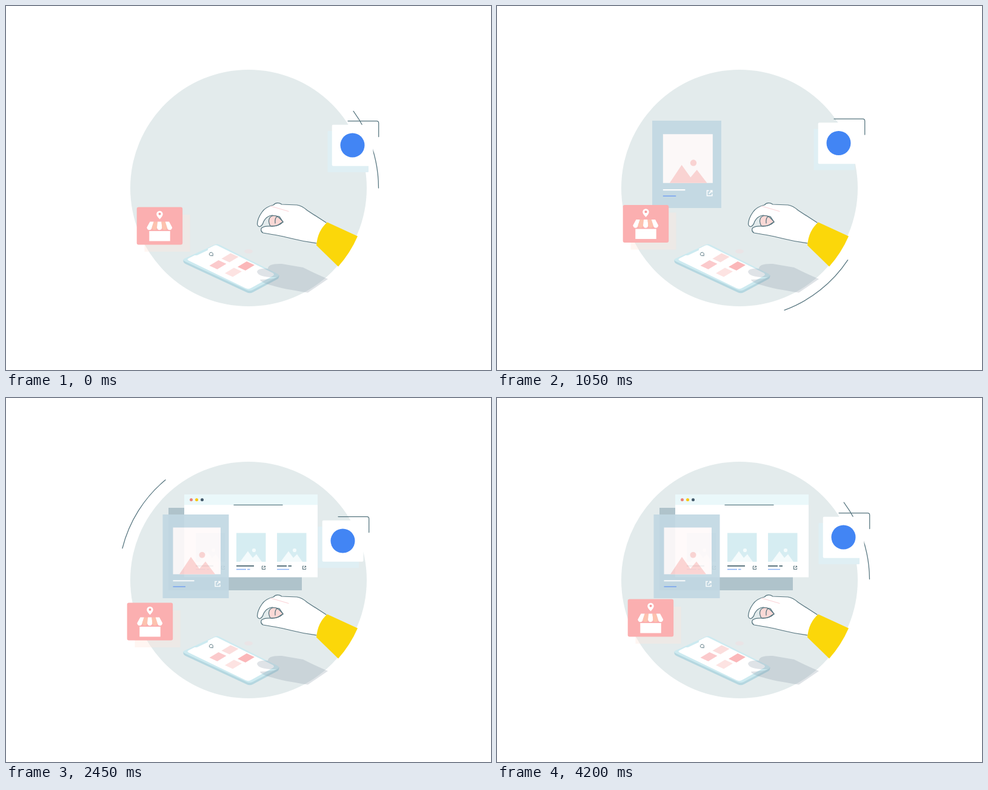
An HTML page that plays this animation: 800 by 600 pixels, repeating every 4.27 s.

```html
<!DOCTYPE html>
<html lang="en">
<head>
<meta charset="utf-8">
<title>Phone shopping</title>
<style>
html, body { margin: 0; width: 100%; height: 100%; overflow: hidden; background: #fff; }
svg { display: block; width: 800px; height: 600px; }
.line { fill: none; stroke: #56757f; stroke-width: 1.25; stroke-linecap: round; stroke-linejoin: round; }
.tint { fill: none; stroke: #fbd3d7; stroke-width: 1.2; stroke-linecap: round; }
</style>
</head>
<body>
<svg viewBox="0 0 800 600">
  <defs>
    <g id="open" fill="none" stroke-width="1.5">
      <path d="M4 1H1V9H9V6M6 1H9V4M9 1L4 6"/>
    </g>
    <g id="tile">
      <path fill="#d6edf2" d="M0 0H48.5V47.5H0Z"/>
      <path fill="#f4fbfc" d="M6 47.5L19 30L27 41L33 35L42 47.5Z"/>
      <circle cx="29" cy="28.5" r="3.1" fill="#f4fbfc"/>
    </g>
  </defs>

  <circle cx="400" cy="300" r="195" fill="#e3ebec"/>
  <path id="arc" class="line"/>

  <!-- phone -->
  <path fill="#b5d7e0" d="M292.5 418V421Q293 423.500 297 425.500L397 472Q402 474.500 407 472L448 450Q450.500 448.500 450.500 444Z"/>
  <path fill="#cdeaf0" d="M294 416.500L344 393.500Q348 391.500 352 393.500L448 441.500Q452 444 448 446.500L407 468Q402 470.500 397 468L295 421Q290.500 418.500 294 416.500Z"/>
  <path fill="#fff" d="M301 416L311 411L315 411L333 402.500V400L343 395Q346 393.500 349 395L440 440Q444 442.500 440 445L405 464.500Q400 467.500 395 465L302 420Q297.500 418 301 416Z"/>
  <ellipse cx="400" cy="404.500" rx="7" ry="3.500" fill="#eae4e6"/>
  <g id="chips"></g>
  <path class="line" style="stroke-width:1" d="M340 411.300A3 2.800 0 1 1 341.300 409.500L341 412"/>
  <path id="shade" fill="#788c9b" fill-opacity=".24"/>

  <g id="win">
    <path fill="#afc3cb" d="M268 181H488V317H268Z"/>
    <path fill="#fff" d="M294 159H514V295.500H294Z"/>
    <path fill="#eaf8fa" d="M294 159H514V176.300H294Z"/>
    <circle cx="305.500" cy="167.700" r="2.500" fill="#ea8076"/>
    <circle cx="314.500" cy="167.700" r="2.500" fill="#f9c80e"/>
    <circle cx="323.500" cy="167.700" r="2.500" fill="#435a6b"/>
    <path stroke="#5d7d85" stroke-width="1.300" d="M375.500 176.300H456.500"/>
    <g id="goods"></g>
  </g>

  <g id="card" opacity=".92">
    <path fill="#c2d8e3" d="M258.500 192H367.500V330H258.500Z"/>
    <path fill="#fffafa" d="M275.500 213.500H354V290.500H275.500Z"/>
    <path fill="#fbd1d0" d="M286 290.500L305 262L319 281.500L329 269.500L345 290.500Z"/>
    <circle cx="323.500" cy="258.700" r="5" fill="#fbd1d0"/>
    <path stroke="#fff" stroke-width="2" d="M275.500 301.300H310.500"/>
    <path stroke="#6f9ff2" stroke-width="1.500" d="M275.500 311H296"/>
    <use href="#open" x="344" y="301.500" stroke="#fff"/>
  </g>

  <path id="hand" class="line" style="fill:#fff"/>
  <path id="palm" class="line" style="fill:#fbd9d6"/>
  <path id="crease" class="line"/>
  <path id="knuckle" class="tint"/>
  <path id="fingers" class="line" style="fill:#fff"/>
  <path id="sleeve" fill="#fbd70a"/>

  <g id="drift">
    <path class="line" d="M564 189.500H611.300Q614.700 189.500 614.700 193V215.500"/>
    <rect x="530.500" y="206" width="67.500" height="68" rx="1" fill="#dfeff4"/>
    <rect x="537.700" y="195.700" width="67.800" height="68" rx="2" fill="#fff"/>
    <circle cx="571.500" cy="229.500" r="20" fill="#4285f4"/>

    <rect x="228.500" y="344" width="75" height="61" fill="#ffe4d8" fill-opacity=".33"/>
    <rect x="215.700" y="331.600" width="75.500" height="62" rx="3" fill="#fbafb0"/>
    <path fill="#fff" d="M253.500 351.500Q248.200 346 248.200 343A5.200 5.200 0 0 1 258.700 343Q258.700 346 253.500 351.500Z"/>
    <circle cx="253.500" cy="342.700" r="2" fill="#f79a9b"/>
    <path fill="#fff" d="M236.300 371H270.700V387.500H236.300Z"/>
    <g id="awning"></g>
  </g>
</svg>
<script>
const LOOP = 4270, STEP = 70;
const $ = id => document.getElementById(id);

// fixed repeats
$('chips').innerHTML = [[369.5, 415, '#fbdedd'], [349.5, 426.5, '#fbcacc'], [396, 428.5, '#fbb7b9'], [375, 439, '#fde3e2']]
  .map(([x, y, c]) => `<path fill="${c}" d="M${x - 14} ${y + 1.5}L${x + 1} ${y - 7.5}L${x + 14} ${y - 1.5}L${x - 1} ${y + 7.5}Z"/>`).join('');

$('goods').innerHTML = [0, 1, 2].map(i => {
  const x = 313 + 67 * i;
  const dark = i === 2 ? `M${x} 276.8h16m2.500 0h5.500` : `M${x} 276.8h29`;
  const blue = i === 2 ? `M${x} 282.5h20` : `M${x} 282.5h16m2 0h4.500`;
  return `<use href="#tile" x="${x}" y="222.500"/>
    <path stroke="#47646f" stroke-width="1.800" d="${dark}"/>
    <path stroke="#85aef4" stroke-width="1.400" d="${blue}"/>
    <g transform="translate(${x + 41.7} 276.500) scale(.65)"><use href="#open" stroke="#47646f"/></g>`;
}).join('');

$('awning').innerHTML = [0, 1, 2, 3, 4].map(i => {
  const w = 8.36, a = 232.3 + w * i, b = a + w, top = 237.5 + 6.3 * i;
  return `<path fill="${i % 2 ? '#fdc2ae' : '#fff'}" d="M${top} 355.500H${top + 6.3}L${b} 365A${w / 2} ${w / 2} 0 0 1 ${a} 365Z"/>`;
}).join('');

// two poses per shape: resting and pinching
const poses = {
  hand: [
    'M528 357L497 337Q488 329 480 328L455 327Q447 322 441 328Q428 331 422 340Q415 350 414.500 359Q415 364 419 363.500Q423 362 425 355Q430 346 439 345L451 347L457 356Q450 363 438 363Q426 362 421.500 366Q419 371 424 374Q455 379 470 383Q490 388 512 391',
    'M531 359L508 348Q495 341 480 338L457 335Q447 334 439 339Q430 341 424 349Q414 362 413 378Q412 382 416 381Q420 378 422 372Q427 360 438 358L448 358L452 361Q448 368 438 368Q428 367 422 371Q417 377 423 381Q440 383 458 381Q488 384 517 389'],
  palm: [
    'M436 362.500C431 354 434 346 442 345.500C450 346 453 352 457 356C452 357 451 364 436 362.500',
    'M436 368C432 365 434 359 440 357.500C446 357 450 358 452 361C449 363 447 368 436 368'],
  crease: ['M447 347Q443 350 444 358', 'M446 357.500Q443 360 443 363'],
  knuckle: ['M437 330L466 338.500M437 330L466 338.500', 'M437 339L467 342M430 343L464 345'],
  fingers: [
    'M457 379Q462 380 468 382M472 383Q478 384 484 385',
    'M457 382Q463 392 469 384M471 383.500Q479 392 484 384'],
  sleeve: [
    'M530 356.500L580 379.500Q568 407 548 429.500L512 394.500Q514 370 530 356.500Z',
    'M536 353L584 370.500Q574 398 555 421.500L516.500 394Q519 368 536 353Z'],
  shade: [
    'M414 438Q415 432 432 433Q432 424 455 425L490 431Q512 442 531 450L498 472.500Q455 466 440 461Q420 456 419 451Q440 450 447 447Q416 448 414 438Z',
    'M405 434Q407 429 428 434Q432 424 455 425L490 431Q512 442 531 450L498 472.500Q455 466 440 461Q420 456 419 451Q440 450 447 447Q412 446 405 434Z']
};

function mix([a, b], k) {
  const end = b.match(/[\d.]+/g);
  let i = 0;
  return a.replace(/[\d.]+/g, n => (+n + (end[i++] - n) * k).toFixed(2));
}

// smooth curve through [time, value] pairs, flat outside them
function track(keys, t) {
  const last = keys.length - 1;
  if (t <= keys[0][0]) return keys[0][1];
  if (t >= keys[last][0]) return keys[last][1];
  const i = keys.findIndex(k => k[0] > t) - 1;
  const slope = j => (keys[j + 1][1] - keys[j][1]) / (keys[j + 1][0] - keys[j][0]);
  const tangent = j => {
    if (j === 0) return slope(0);
    if (j === last) return slope(last - 1);
    const p = slope(j - 1), q = slope(j);
    return p * q <= 0 ? 0 : 2 * p * q / (p + q);
  };
  const [t0, v0] = keys[i], [t1, v1] = keys[i + 1];
  const h = t1 - t0, u = (t - t0) / h, w = u * u * (3 - 2 * u);
  return v0 + (v1 - v0) * w + h * u * (1 - u) * ((1 - u) * tangent(i) - u * tangent(i + 1));
}

const swing = [[0, 0], [560, 41], [700, 46.7], [1050, 69.8], [1120, 78.5], [1610, 140.3], [2240, 217],
  [2450, 230.3], [2800, 260.5], [3080, 283.7], [3920, 340.5], [4200, 359.6], [4270, 360]];
const driftX = [[0, 0], [700, -5], [1050, -8], [1610, -14.5], [2100, -16.6], [2450, -16], [2800, -12],
  [3080, -8], [3360, -4.3], [3920, -.8], [4200, 0]];
const driftY = [[0, 0], [700, -3], [1050, -3.5], [1610, -1.8], [2450, 6], [2800, 10.3], [3080, 12.5],
  [3360, 11.5], [3920, 3.2], [4200, 0]];
const pop = [[0, 0], [90, .29], [260, .95], [370, 1.055], [440, 1.045], [640, 1]];
const pinch = [[210, 0], [560, 1], [700, 1], [1000, 0]];

function grow(id, x, y, s) {
  $(id).style.display = s > 0 ? '' : 'none';
  $(id).setAttribute('transform', `translate(${x} ${y}) scale(${s}) translate(${-x} ${-y})`);
}

function point(deg) {
  const a = deg * Math.PI / 180;
  return `${400 + 214.5 * Math.cos(a)} ${300 + 214.5 * Math.sin(a)}`;
}

function draw(t) {
  const end = track(swing, t);
  $('arc').setAttribute('d', `M${point(end - 36.2)}A214.5 214.5 0 0 1 ${point(end)}`);
  $('drift').setAttribute('transform', `translate(${track(driftX, t)} ${track(driftY, t)})`);
  grow('card', 313, 261, track(pop, t - 610));
  grow('win', 404, 227, track(pop, t - 1180));
  const k = track(pinch, t);
  for (const id in poses) $(id).setAttribute('d', mix(poses[id], k));
  $('fingers').style.display = k > .3 ? '' : 'none';
}

const start = performance.now();
function tick() {
  const t = (performance.now() - start) % LOOP;
  draw(Math.floor(t / STEP) * STEP);
  requestAnimationFrame(tick);
}
tick();
</script>
</body>
</html>
```
